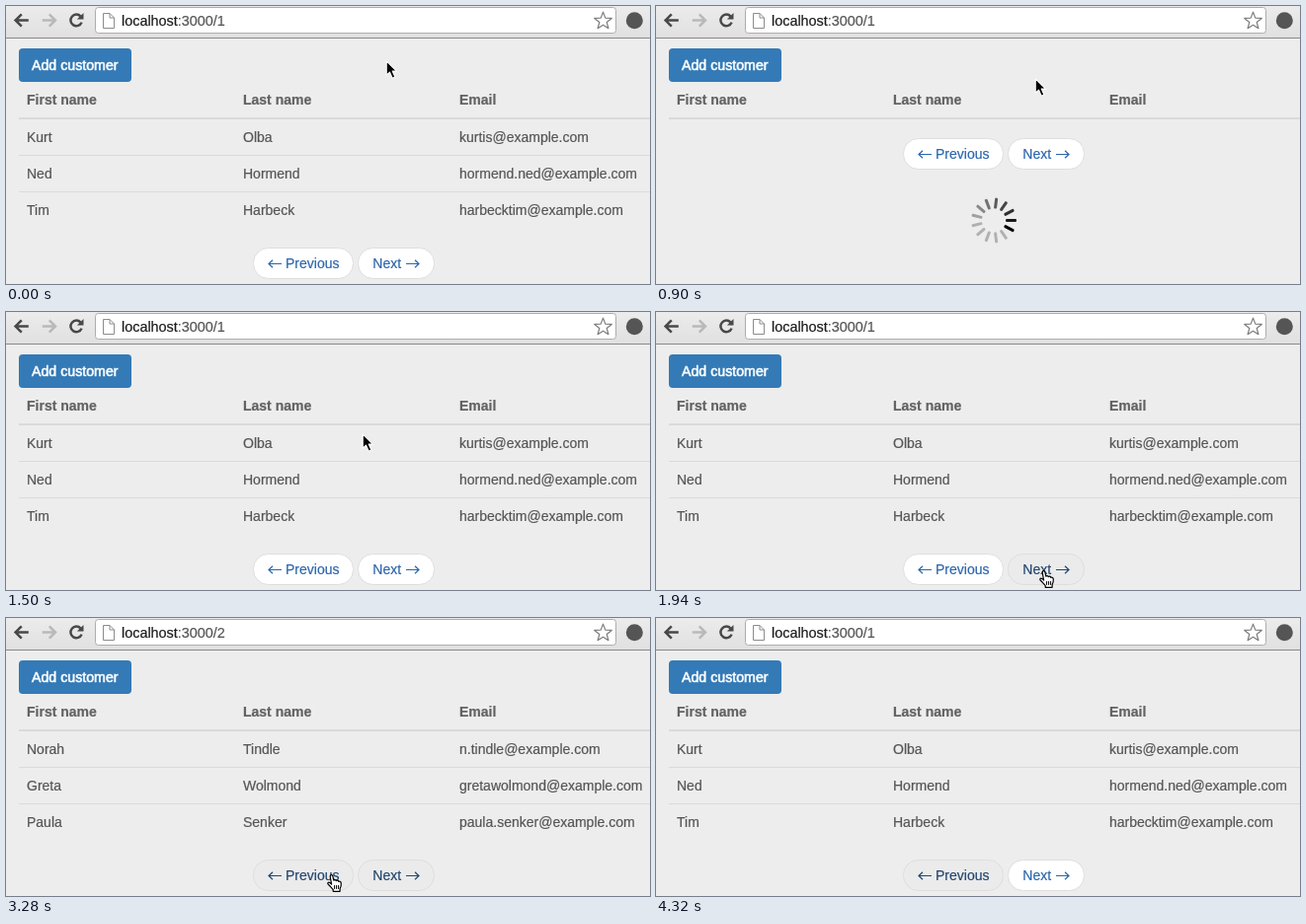
Animation, 652 px wide and 282 px high, one loop 5070 ms. Source, as an HTML page:

```html
<!DOCTYPE html>
<html lang="en">
<head>
<meta charset="utf-8">
<title>Customer table</title>
<style>
  html, body { margin: 0; width: 100%; height: 100%; overflow: hidden; background: #ededed; }
  svg { display: block; font: 14px "Liberation Sans", Arial, sans-serif; }
  text { fill: currentColor; stroke: currentColor; stroke-width: .2; }
  .table { color: #555; }
  .head { font-weight: bold; color: #626262; }
  .rule { fill: #dadada; }
  .pill { color: #2b66ab; }
  .pill rect { fill: #fff; stroke: #dedede; }
  .pill path { fill: none; stroke: currentColor; stroke-width: 1.2; }
  .pill.hover { color: #23466f; }
  .pill.hover rect { fill: #ebebeb; }
  .icon { fill: none; stroke: #484848; stroke-width: 2.5; }
</style>
</head>
<body>
<svg width="652" height="282" viewBox="0 0 652 282">
  <defs>
    <linearGradient id="chrome" x2="0" y2="1">
      <stop offset="0" stop-color="#ececec"/>
      <stop offset="1" stop-color="#e0e0e0"/>
    </linearGradient>
  </defs>

  <rect width="652" height="282" fill="#ededed"/>
  <g id="toolbar">
    <rect width="652" height="32" fill="url(#chrome)"/>
    <rect y="32" width="652" height="1" fill="#8a8a8a"/>
    <path id="back" class="icon" d="M22.8 14.5H10.3M15.8 8.3L9.6 14.5L15.8 20.7"/>
    <path id="forward" class="icon" d="M36.8 14.5H49.3M43.8 8.3L50 14.5L43.8 20.7" style="stroke:#b9b9b9"/>
    <g id="reload">
      <path class="icon" d="M75.6 10.6A5.8 5.8 0 1 0 76.6 16.6"/>
      <path d="M78.5 7V13.6H71.9Z" fill="#484848"/>
    </g>
    <path id="stop" class="icon" d="M65.5 9L76.5 20M76.5 9L65.5 20"/>
    <rect x="90.5" y="1.5" width="527" height="26" rx="3" fill="#fff" stroke="#adadad"/>
    <path d="M98.5 7.5H105L109.5 12V22.5H98.5ZM105 7.5V12H109.5" fill="#fff" stroke="#8c8c8c"/>
    <text x="117" y="20" font-size="14.4" color="#1c1c1c">localhost<tspan id="path" color="#555"></tspan></text>
    <path id="star" fill="#fff" stroke="#7d7d7d" stroke-width="1.2" stroke-linejoin="round"/>
    <circle cx="636.3" cy="14.7" r="8.5" fill="#555"/>
  </g>

  <rect x="13" y="43" width="114" height="34" rx="4" fill="#337ab7"/>
  <text x="26" y="65" font-size="14.2" color="#fff" style="stroke-width:.55">Add customer</text>
  <g id="head" class="head"></g>
  <rect class="rule" x="13" y="113" width="639" height="2"/>
  <g id="rows" class="table"></g>

  <g id="pager">
    <g id="prev" class="pill">
      <rect x="250.5" y="245.5" width="101" height="31" rx="15"/>
      <path d="M279 261.5H266M270 257.8L266 261.5L270 265.2"/>
      <text x="283" y="266">Previous</text>
    </g>
    <g id="next" class="pill">
      <rect x="356.5" y="245.5" width="77" height="31" rx="15"/>
      <text x="371.3" y="266">Next</text>
      <path d="M405 261.5H418M414 257.8L418 261.5L414 265.2"/>
    </g>
  </g>

  <g id="spinner" transform="translate(342 217.5)"></g>

  <path id="arrow" d="M1.2 .8V15.2L4.5 12.1L7.2 18.3L9.9 17.1L7.2 11.1H11.5Z"
        fill="#000" stroke="#fff" stroke-width="1.1" stroke-linejoin="round"/>
  <g id="hand" stroke="#000" stroke-width="1.2" stroke-linejoin="round" stroke-linecap="round">
    <path fill="#fff" d="M3.2 2.3C3 .2 5.5 .1 5.9 2.1L6.8 6.2C7.4 5.2 9 5.4 9.3 6.6
      C10.1 5.7 11.5 6.1 11.8 7.3C13 6.7 14.2 7.6 14.3 9C14.5 11.5 14 13 13.1 14.6
      V17.3H6.2V15.5C4.3 13.8 3.2 11.8 1.1 10C.1 8.8 1.5 7.7 2.7 8.4L4.6 10Z"/>
    <path fill="none" stroke-width="1" d="M7.6 11.5V14.5M9.6 11.5V14.5M11.6 11.5V14.5"/>
  </g>
</svg>

<script>
const NS = 'http://www.w3.org/2000/svg';
const LOOP = 5070;
const BLADES = 13;
const TRAIL = 0.6 * BLADES;
const COLUMNS = [21, 240, 459];
const PAGES = {
  1: [['Kurt', 'Olba', 'kurtis@example.com'],
      ['Ned', 'Hormend', 'hormend.ned@example.com'],
      ['Tim', 'Harbeck', 'harbecktim@example.com']],
  2: [['Norah', 'Tindle', 'n.tindle@example.com'],
      ['Greta', 'Wolmond', 'gretawolmond@example.com'],
      ['Paula', 'Senker', 'paula.senker@example.com']]
};

// Each cue changes part of the state; the rest carries over.
const CUES = [
  [0, { url: 1, rows: 1, loading: false, spin: null, hover: '', arrow: [384, 55], hand: null }],
  [450, { loading: true, arrow: [383, 73] }],
  [900, { loading: false, rows: 0, spin: 1 }],
  [1050, { spin: 3, arrow: [360, 123] }],
  [1200, { spin: 5 }],
  [1350, { spin: 7 }],
  [1500, { spin: null, rows: 1 }],
  [1650, { arrow: [374, 123] }],
  [1790, { arrow: [402, 225] }],
  [1940, { arrow: null, hand: [388, 262], hover: 'next' }],
  [2090, { hand: [387, 263] }],
  [2240, { url: 2, spin: 1 }],
  [2380, { spin: 3 }],
  [2530, { spin: 5 }],
  [2680, { spin: 7 }],
  [2830, { spin: null, rows: 2 }],
  [3280, { hand: [325, 260], hover: 'prev next' }],
  [3430, { hand: [313, 260] }],
  [3580, { hover: 'prev' }],
  [3880, { url: 1, spin: 3 }],
  [4020, { spin: 5 }],
  [4170, { spin: 7 }],
  [4320, { spin: null, rows: 1, hand: null }]
];

const $ = id => document.getElementById(id);

function add(parent, tag, attrs, text) {
  const node = document.createElementNS(NS, tag);
  for (const key in attrs) node.setAttribute(key, attrs[key]);
  if (text) node.textContent = text;
  parent.appendChild(node);
  return node;
}

function addRow(parent, cells, y) {
  return cells.map((text, i) => add(parent, 'text', { x: COLUMNS[i], y }, text));
}

function show(node, visible) {
  node.style.display = visible ? '' : 'none';
}

function place(node, point) {
  show(node, point);
  if (point) node.setAttribute('transform', `translate(${point})`);
}

addRow($('head'), ['First name', 'Last name', 'Email'], 100);
const cells = PAGES[1].map((row, i) => addRow($('rows'), row, 138 + 37 * i));
for (const y of [151, 188]) add($('rows'), 'rect', { class: 'rule', x: 13, y, width: 639, height: 1 });

const blades = Array.from({ length: BLADES }, (_, i) => add($('spinner'), 'rect', {
  x: 12, y: -1.5, width: 11, height: 3, rx: 1.2, transform: `rotate(${i * 360 / BLADES})`
}));

const starPoints = Array.from({ length: 10 }, (_, i) => {
  const r = i % 2 ? 3.9 : 9.2, a = (i / 5 - 0.5) * Math.PI;
  return [604.5 + r * Math.cos(a), 15.3 + r * Math.sin(a)].map(v => v.toFixed(2));
});
$('star').setAttribute('d', `M${starPoints.join('L')}Z`);

// SVG tspans inherit paint from their parent's colour, so set it on the tspan itself.
$('path').style.cssText = 'fill: currentColor; stroke: currentColor';

function stateAt(time) {
  return Object.assign({}, ...CUES.filter(cue => cue[0] <= time).map(cue => cue[1]));
}

function draw(time) {
  const s = stateAt(time);
  show($('reload'), !s.loading);
  show($('stop'), s.loading);
  $('path').textContent = ':3000/' + s.url;

  show($('rows'), s.rows);
  if (s.rows) {
    cells.forEach((row, i) => row.forEach((cell, j) => { cell.textContent = PAGES[s.rows][i][j]; }));
  }
  $('pager').setAttribute('transform', `translate(0 ${s.rows ? 0 : -111})`);
  for (const id of ['prev', 'next']) $(id).classList.toggle('hover', s.hover.includes(id));

  show($('spinner'), s.spin !== null);
  blades.forEach((blade, i) => {
    const behind = (s.spin - i + BLADES) % BLADES;
    blade.setAttribute('opacity', Math.max(0.25, 1 - 0.75 * behind / TRAIL));
  });

  place($('arrow'), s.arrow);
  place($('hand'), s.hand);
}

const start = performance.now();
function tick() {
  draw((performance.now() - start) % LOOP);
  requestAnimationFrame(tick);
}
tick();
</script>
</body>
</html>
```
